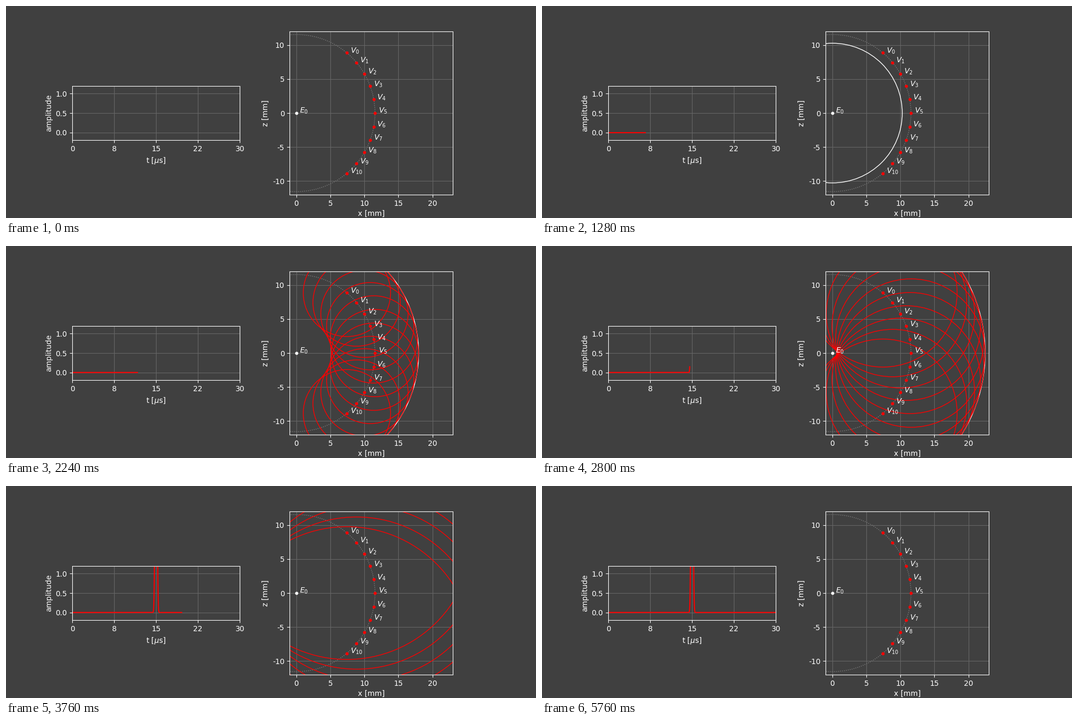
Write a matplotlib script that moves like this. It is 1000 px wide and 400 px high and loops after 8 s.

```python
import numpy as np
import matplotlib.pyplot as plt
from matplotlib.animation import FuncAnimation
from matplotlib.patches import Circle

BG, FG, GRID = "#404040", "white", "#666666"
SPEED = 1.54                 # mm per microsecond
T_END = 30.0                 # microseconds
RADIUS = SPEED * T_END / 4   # distance from emitter to virtual sources
SIGMA = 0.142                # pulse width in microseconds
SWEEP, FRAMES, INTERVAL = 144, 200, 40

plt.rcParams.update({
    "font.family": "DejaVu Sans", "font.size": 10,
    "text.color": FG, "axes.labelcolor": FG, "axes.edgecolor": FG,
    "xtick.color": FG, "ytick.color": FG,
    "axes.facecolor": BG, "figure.facecolor": BG,
    "axes.grid": True, "grid.color": GRID, "grid.linewidth": 0.8,
    "axes.unicode_minus": False,
})

fig = plt.figure(figsize=(10, 4), dpi=100)

# Column widths 3:4 with a tenth of the mean width between them
total = 0.775 / 1.05
left_w, right_w = total * 3 / 7, total * 4 / 7
right_x = 0.9 - right_w / 2 - 0.154
ax_t = fig.add_axes([0.125, 0.11 + 0.77 / 3, left_w, 0.77 / 3])
ax_x = fig.add_axes([right_x, 0.11, 0.308, 0.77])

ax_t.set(xlim=(0, T_END), ylim=(-0.2, 1.2),
         xlabel=r"t [$\mu$s]", ylabel="amplitude")
ticks = np.linspace(0, T_END, 5)
ax_t.set_xticks(ticks, [f"{v:.0f}" for v in ticks])
ax_t.set_yticks([0, 0.5, 1])

ax_x.set(xlim=(-1, 23), ylim=(-12, 12), xlabel="x [mm]", ylabel="z [mm]")
ax_x.set_xticks(range(0, 21, 5))
ax_x.set_yticks(range(-10, 11, 5))


def ring(center, radius, color, zorder, **style):
    patch = Circle(center, radius, fill=False, ec=color, lw=1,
                   zorder=zorder, **style)
    return ax_x.add_patch(patch)


def point(x, z, label, color):
    ax_x.plot(x, z, ".", ms=6.5, color=color, zorder=3)
    ax_x.text(x + 0.5, z, label, zorder=4)


angles = np.radians(np.arange(50, -51, -10))
sources = [(RADIUS * np.cos(a), RADIUS * np.sin(a)) for a in angles]

ring((0, 0), RADIUS, "gray", 1.6, ls=":")
point(0, 0, "$E_0$", FG)
for i, (x, z) in enumerate(sources):
    point(x, z, f"$V_{{{i}}}$", "red")

front = ring((0, 0), 0, FG, 2)
echoes = [ring(p, 0, "red", 2.1) for p in sources]

# All echoes reach the emitter together
time = np.linspace(0, T_END, SWEEP * 20 + 1)
arrival = 2 * RADIUS / SPEED
signal = len(sources) * np.exp(-((time - arrival) / SIGMA) ** 2 / 2)
trace, = ax_t.plot([], [], color="red", lw=1.5)


def update(frame):
    step = min(frame, SWEEP)
    reach = SPEED * T_END * step / SWEEP
    count = step * 20 + 1 if step else 0
    trace.set_data(time[:count], signal[:count])
    front.set_radius(reach)
    front.set_visible(step > 0)
    for echo in echoes:
        echo.set_radius(max(reach - RADIUS, 0))
        echo.set_visible(reach > RADIUS + 1e-9)
    return [trace, front, *echoes]


anim = FuncAnimation(fig, update, frames=FRAMES, interval=INTERVAL,
                     init_func=lambda: update(0), repeat=True,
                     repeat_delay=0, blit=False)
plt.show()
```
